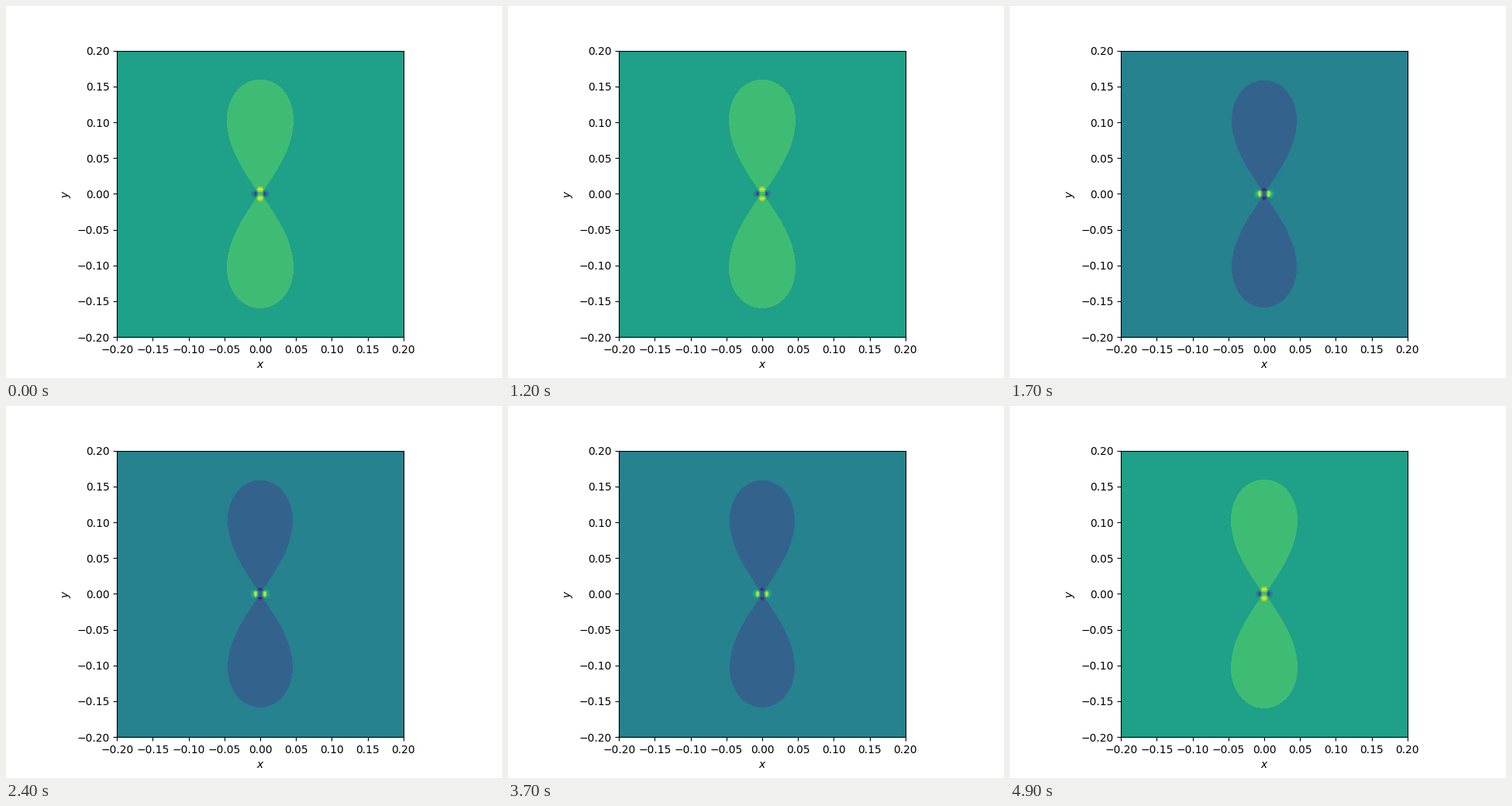
Write a matplotlib script that moves like this. It is 640 by 480 pixels and loops after 5000 ms.

```python
import numpy as np
import matplotlib.pyplot as plt
from matplotlib.animation import FuncAnimation

FRAMES = 50
INTERVAL = 100
HALF_WIDTH = 0.2
WAVE_NUMBER = 2 * np.pi
SOFTENING = 0.002725
CORE_RADIUS = 0.0045
FIELD_RANGE = 43.2


def dipole_field(x, y):
    """Horizontal field of an oscillating dipole along x, smoothed at its core."""
    r2 = x**2 + y**2
    s2 = r2 + SOFTENING**2
    near = (3 * x**2 - s2) / s2**2.5
    induced = WAVE_NUMBER**2 / np.sqrt(s2)
    core = 1 - np.exp(-(r2 / CORE_RADIUS**2) ** 2)
    field = -(near + induced) * core
    return field * FIELD_RANGE / np.ptp(field)


axis = np.linspace(-HALF_WIDTH, HALF_WIDTH, 100)
X, Y = np.meshgrid(axis, axis)
field = dipole_field(X, Y)

fig, ax = plt.subplots(figsize=(6.4, 4.8), dpi=100)
ax.set_aspect("equal")
ax.set_xlim(-HALF_WIDTH, HALF_WIDTH)
ax.set_ylim(-HALF_WIDTH, HALF_WIDTH)
ax.set_xlabel("$x$")
ax.set_ylabel("$y$")
contours = None


def draw(frame):
    global contours
    if contours is not None:
        contours.remove()
    # Contour levels follow the amplitude, so the picture flips with its sign.
    amplitude = np.cos(2 * np.pi * frame / FRAMES)
    contours = ax.contourf(X, Y, amplitude * field, cmap="viridis")
    return [contours]


animation = FuncAnimation(fig, draw, frames=FRAMES, init_func=lambda: draw(0),
                          interval=INTERVAL, repeat=True, repeat_delay=0)
plt.show()
```
